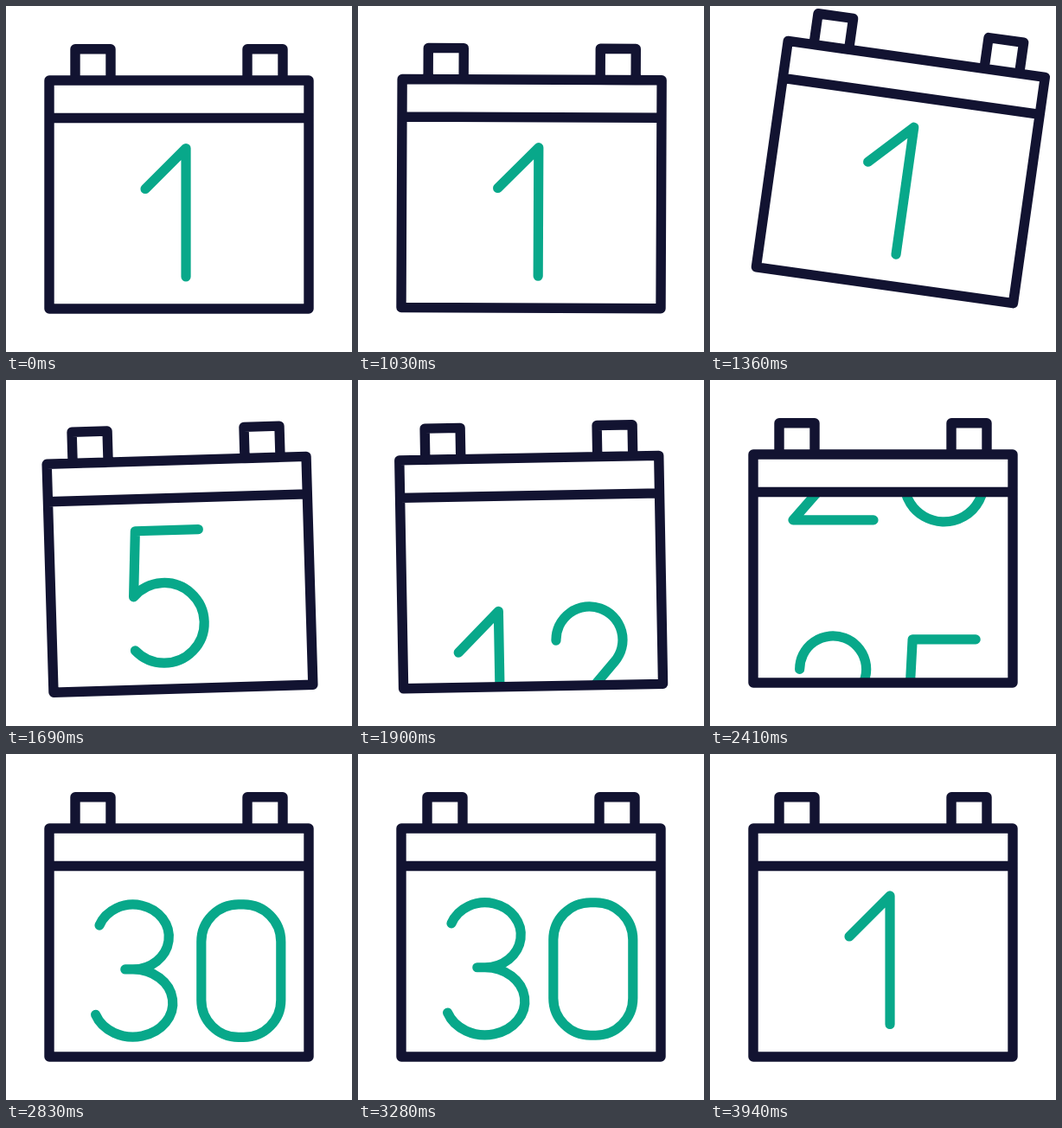
An HTML page that plays this animation: 400 px wide and 400 px high, repeating every 3.97 s.

```html
<!DOCTYPE html>
<html lang="en">
<head>
<meta charset="utf-8">
<title>Calendar</title>
<style>
  html, body { margin: 0; width: 100%; height: 100%; overflow: hidden; background: #fff; }
  svg { display: block; width: 100%; height: 100%; }
  g { fill: none; stroke-linecap: round; stroke-linejoin: round; }
</style>
</head>
<body>
<svg viewBox="0 0 400 400">
  <defs><clipPath id="page"><rect x="50" y="130" width="300" height="220"/></clipPath></defs>
  <g id="calendar">
    <g clip-path="url(#page)" stroke="#08a88a" stroke-width="11.2">
      <path id="leaving"/>
      <path id="entering"/>
    </g>
    <path stroke="#121331" stroke-width="11.4"
      d="M50 86H350V350H50ZM50 129.5H350M80 86V49.8H121V86ZM279 86V49.8H320V86Z"/>
  </g>
</svg>
<script>
const LOOP = 3970;
const FRAME = 30;
const LAST_DAY = 30;
const ROW = 284;
const TOP = 161;

// Points the day reel runs through: [time in ms, day]
const REEL = [[1510, 1], [1690, 5.005], [2140, 20.51], [2410, 25.475], [2800, 30.047], [3100, 30]];

const byId = id => document.getElementById(id);

function ease(t, from, to) {
  const u = Math.min(1, Math.max(0, (t - from) / (to - from)));
  return u * u * (3 - 2 * u);
}

// Smooth curve through the points, flat at both ends and at turning points
function follow(points, t) {
  const last = points.length - 1;
  const i = points.findIndex(point => point[0] > t);
  if (i === 0) return points[0][1];
  if (i < 0) return points[last][1];
  const slope = k => (points[k + 1][1] - points[k][1]) / (points[k + 1][0] - points[k][0]);
  const speed = k => {
    if (k === 0 || k === last) return 0;
    const before = slope(k - 1), after = slope(k);
    return before * after > 0 ? 2 * before * after / (before + after) : 0;
  };
  const [t0, a] = points[i - 1];
  const [t1, b] = points[i];
  const span = t1 - t0;
  const u = (t - t0) / span;
  const w = 1 - u;
  return w * w * ((1 + 2 * u) * a + u * span * speed(i - 1)) +
         u * u * ((1 + 2 * w) * b - w * span * speed(i));
}

// Clockwise arc between two angles in degrees, without its leading command
function arc(cx, cy, rx, ry, from, to) {
  const at = deg => {
    const angle = deg * Math.PI / 180;
    return `${cx + rx * Math.cos(angle)} ${cy + ry * Math.sin(angle)}`;
  };
  return `${at(from)}A${rx} ${ry} 0 ${to - from > 180 ? 1 : 0} 1 ${at(to)}`;
}

const ring = (cy, rx, ry) => `M${arc(0, cy, rx, ry, 0, 359.9)}Z`;

const corner = i => arc(i % 3 ? 3 : -3, i < 2 ? 43 : 110.5, 43, 43, 180 + 90 * i, 270 + 90 * i);

// Digit outlines, centred on x = 0 and hanging from y = 0
const DIGITS = [
  `M${[0, 1, 2, 3].map(corner).join('L')}Z`,
  'M-23.5 50.5L23.5 3.5V152',
  `M${arc(0, 38.5, 38.5, 38.5, 180, 401)}L-46.5 150H46.5`,
  `M${arc(3, 37.5, 41.5, 37.5, 201, 450)}H-6M${arc(3, 114, 46, 39, 270, 520)}`,
  'M22 152V4L-46 116H46',
  `M37 4H-36L${arc(-5.6, 111, 46.3, 46.3, 222, 498)}`,
  `M18 3L-38 81${ring(106, 46, 46)}`,
  'M-43 4H43L-17 152',
  ring(37.5, 38, 37.5) + ring(114, 46, 39),
  `M-18 149L38 71${ring(46, 46, 46)}`
];

const shiftX = (path, dx) => path.replace(/([ML])(-?[\d.]+(?:e-?\d+)?)/g, (_, c, x) => c + (+x + dx))
  .replace(/H(-?[\d.]+)/g, (_, x) => 'H' + (+x + dx))
  .replace(/(A\S+ \S+ 0 \d 1 )(\S+)/g, (_, head, x) => head + (+x + dx));

function dayPath(n) {
  if (n < 10) return DIGITS[n];
  return shiftX(DIGITS[Math.floor(n / 10)], -64).replace(/V/g, 'v0V') && pair(n);
}

function pair(n) {
  return shiftColumn(DIGITS[Math.floor(n / 10)], -64) + shiftColumn(DIGITS[n % 10], 64);
}

// Moves every x coordinate of an outline sideways
function shiftColumn(path, dx) {
  return shiftX(path, dx);
}

function showDay(shape, day, position) {
  const n = (day - 1) % LAST_DAY + 1;
  const x = (n < 10 ? 184.2 : 197.9) + n * .33;
  shape.setAttribute('d', dayPath(n));
  shape.setAttribute('transform', `translate(${x} ${TOP + (position - day) * ROW})`);
}

function render(t) {
  const windUp = ease(t, 985, 1430);
  const swing = ease(t, 1485, 1715);
  const settle = ease(t, 1715, 2090);
  const tilt = 8.6 * windUp - 10.65 * swing + 2.05 * settle;
  const slide = swing - settle;
  byId('calendar').setAttribute('transform',
    `translate(${5 * slide} ${slide}) rotate(${tilt} 395 350)`);

  const position = follow(REEL, t) + ease(t, 3190, 3960);
  const day = Math.floor(position);
  showDay(byId('leaving'), day, position);
  showDay(byId('entering'), day + 1, position);
}

const start = performance.now();
function tick() {
  const t = (performance.now() - start) % LOOP;
  render(Math.floor((t - 8) / FRAME) * FRAME + 10);
  requestAnimationFrame(tick);
}
tick();
</script>
</body>
</html>
```
